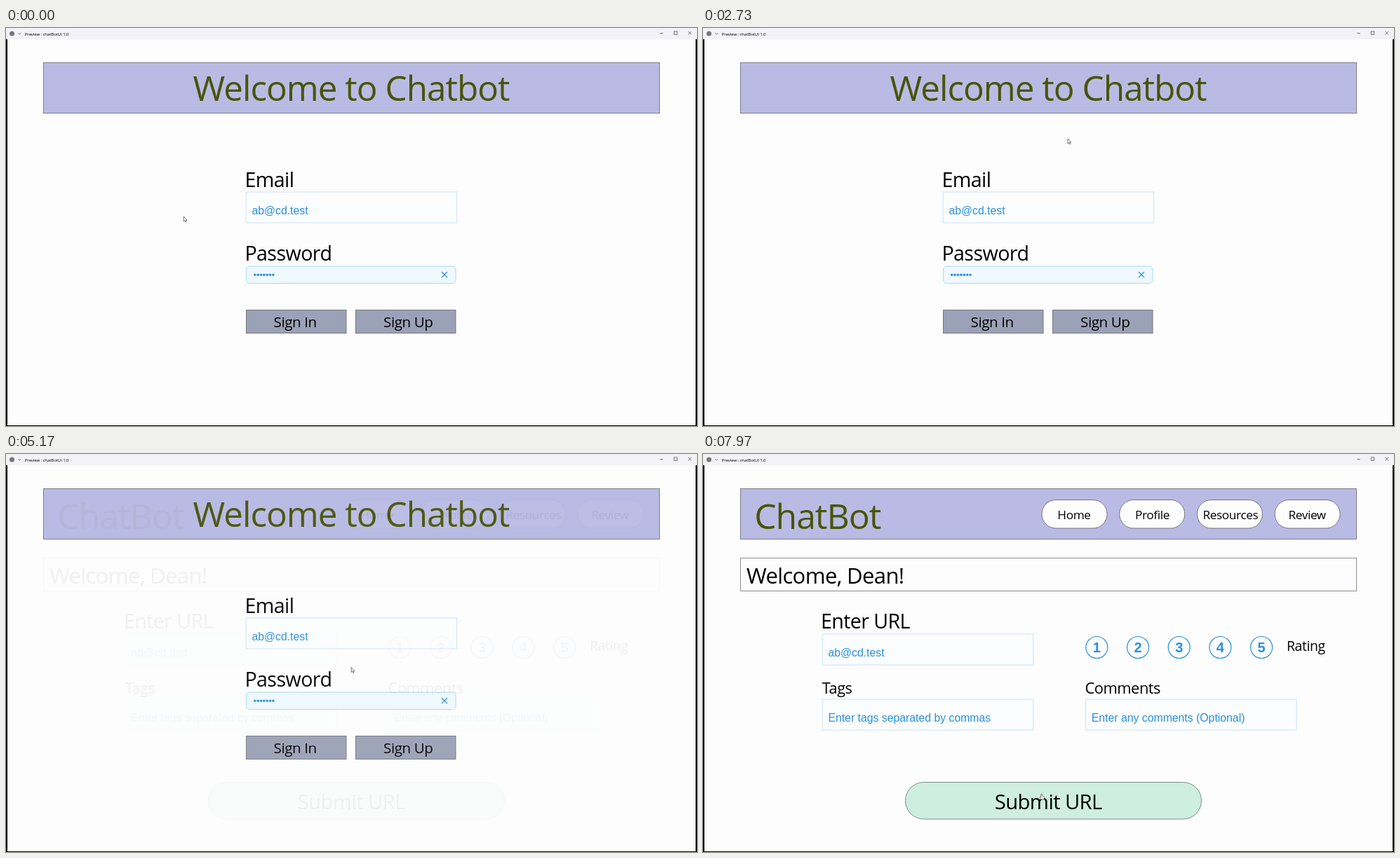
Write an HTML page that moves like this. It is 985 px wide and 568 px high and loops after 8000 ms.

```html
<!DOCTYPE html>
<html lang="en">
<head>
<meta charset="utf-8">
<title>Chatbot preview</title>
<style>
  html, body { margin: 0; width: 100%; height: 100%; overflow: hidden; background: #fdfdfd; }
  svg { display: block; width: 100vw; height: 100vh; }
  text { font-family: "Open Sans", "Noto Sans", sans-serif; letter-spacing: -.02em; fill: #000; white-space: pre; }
  .title { fill: #485408; }
  .input { font-family: "Liberation Sans", Arial, sans-serif; letter-spacing: 0; fill: #2990dd; }
  .digit { font-weight: bold; text-anchor: middle; }
  .bar { fill: #babbe4; stroke: #7c7c88; }
  .button { fill: #9ba1b6; stroke: #77797f; }
  .pill { fill: #fdfdfd; stroke: #74747c; }
  .outline { fill: none; stroke: #8c8c92; }
  .field { fill: #fcfdfe; stroke: #cbe2f7; }
  .secret { fill: #eff8fd; stroke: #a2ddf3; }
  .submit { fill: #cdeee0; stroke: #7d8a85; }
  .ring { fill: #fdfdfd; stroke: #2990dd; stroke-width: 1.2; }
  .mark { fill: none; stroke: #2990dd; stroke-width: 1.2; }
  .control { fill: none; stroke: #555; stroke-width: .8; }
  .pointer { fill: #fff; stroke: #555; stroke-width: .8; stroke-linejoin: round; }
</style>
</head>
<body>
<svg id="stage" viewBox="0 0 985 568" preserveAspectRatio="none">
  <rect width="985" height="568" fill="#fdfdfd"/>
  <g id="login"></g>
  <g id="home" opacity="0"><rect y="16" width="985" height="552" fill="#fdfdfd"/></g>
  <g id="frame"></g>
  <g id="cursor">
    <path id="arrow" class="pointer" d="M0 0V7.1L1.6 5.6L2.7 8L3.7 7.5L2.7 5.2H4.8Z"/>
    <path id="hand" class="pointer" d="M-.7 .6Q0 -.3 .7 .6V3L3.4 3.6Q4.1 3.9 4 4.8L3.4 8H-.5L-2.5 5.2Q-2.6 4.2 -.7 5Z"/>
  </g>
</svg>
<script>
const LOOP = 8000;
const FADE_START = 5100, FADE_TIME = 500;
const byId = id => document.getElementById(id);
const login = byId("login"), home = byId("home"), frame = byId("frame");
const cursor = byId("cursor"), arrow = byId("arrow"), hand = byId("hand");

function add(parent, tag, attrs, content) {
  const el = document.createElementNS("http://www.w3.org/2000/svg", tag);
  for (const key in attrs) el.setAttribute(key, attrs[key]);
  if (content) el.textContent = content;
  parent.appendChild(el);
}
const box = (parent, cls, x, y, width, height, rx = 0) =>
  add(parent, "rect", { class: cls, x, y, width, height, rx });
const label = (parent, content, x, y, size, cls = "") =>
  add(parent, "text", { class: cls, x, y, "font-size": size }, content);
const line = (parent, cls, d) => add(parent, "path", { class: cls, d });

function input(parent, content, x, y) {
  box(parent, "field", x, y, 300.5, 44);
  label(parent, content, x + 8.2, y + 32, 15.8, "input");
}

function buildLogin() {
  box(login, "bar", 53.5, 49.5, 878, 72);
  label(login, "Welcome to Chatbot", 266.5, 104, 49.4, "title");
  label(login, "Email", 340.4, 227, 28.6);
  input(login, "ab@cd.test", 342.2, 234);
  label(login, "Password", 340.4, 332.3, 28.6);
  box(login, "secret", 342.5, 340, 298.5, 24.5, 5);
  for (let i = 0; i < 7; i++)
    add(login, "circle", { cx: 354.7 + i * 4.37, cy: 352.3, r: 1.75, fill: "#2990dd" });
  line(login, "mark", "M621 348L629 356M629 348L621 356");
  box(login, "button", 342.5, 402.5, 142.5, 33);
  box(login, "button", 498.5, 402.5, 142.5, 33);
  label(login, "Sign In", 381.5, 427, 20.6);
  label(login, "Sign Up", 538, 427, 20.6);
}

function buildHome() {
  box(home, "bar", 53.5, 49.5, 878, 72);
  label(home, "ChatBot", 73.2, 106.5, 49.8, "title");
  [["Home", 505.3], ["Profile", 616], ["Resources", 712.4], ["Review", 834.4]].forEach(([name, x], i) => {
    box(home, "pill", 483 + i * 110.7, 65.5, 93, 40.5, 20);
    label(home, name, x, 93.2, 17.2);
  });
  box(home, "outline", 53.5, 148.5, 878, 47);
  label(home, "Welcome, Dean!", 62, 185, 31);
  label(home, "Enter URL", 168, 249.3, 28.6);
  input(home, "ab@cd.test", 170.2, 257);
  for (let i = 0; i < 5; i++) {
    const x = 561.3 + i * 58.7;
    add(home, "circle", { class: "ring", cx: x, cy: 276, r: 15.5 });
    label(home, String(i + 1), x, 283.2, 20, "input digit");
  }
  label(home, "Rating", 832, 281, 19.4);
  label(home, "Tags", 169.8, 342, 21.6);
  input(home, "Enter tags separated by commas", 170.2, 350);
  label(home, "Comments", 544.4, 342, 21.8);
  input(home, "Enter any comments (Optional)", 545.6, 350);
  box(home, "submit", 288.5, 468.5, 422, 52.5, 26.2);
  label(home, "Submit URL", 415.8, 507, 29.2);
}

function buildFrame() {
  add(frame, "rect", { width: 985, height: 16, fill: "#f2f2f7" });
  add(frame, "path", { d: "M0 16H2V567H983V16H985V568H0Z", fill: "#000" });
  add(frame, "circle", { cx: 8.5, cy: 8, r: 3.5, fill: "#777" });
  line(frame, "control", "M17.2 7.2L19.2 9.2L21.2 7.2");
  label(frame, "Preview : chatBotUI 1.0", 26.8, 10.5, 6.15);
  line(frame, "control", "M932.3 7.5H936.8M952.3 4.8H956.8V9.3H952.3ZM972.4 4.8L977 9.4M977 4.8L972.4 9.4");
}

// Pointer stops: time, x, y
const stops = [
  [0, 253.3, 269], [700, 253.3, 269], [1500, 256.8, 277.3], [1750, 256.8, 277.3],
  [2650, 520, 158], [2850, 520, 158], [3680, 450.5, 416], [4250, 450.5, 416],
  [4780, 492, 305], [5050, 492, 305], [5900, 496.5, 295], [6400, 496.5, 295],
  [7500, 482.5, 485], [LOOP, 482.5, 485]
];
const clamp = v => Math.min(1, Math.max(0, v));
const ease = p => .5 - Math.cos(Math.PI * clamp(p)) / 2;

function pointerAt(t) {
  const i = stops.findIndex(s => s[0] > t);
  const [t0, x0, y0] = stops[i - 1], [t1, x1, y1] = stops[i];
  const p = ease((t - t0) / (t1 - t0));
  return [x0 + (x1 - x0) * p, y0 + (y1 - y0) * p];
}

function render(t) {
  home.setAttribute("opacity", ease((t - FADE_START) / FADE_TIME));
  const [x, y] = pointerAt(t);
  const over = t < FADE_START ? y > 402 && y < 436 : y > 468;
  cursor.setAttribute("transform", `translate(${x} ${y})`);
  arrow.setAttribute("visibility", over ? "hidden" : "visible");
  hand.setAttribute("visibility", over ? "visible" : "hidden");
}

buildLogin();
buildHome();
buildFrame();
const start = performance.now();
function tick() {
  render((performance.now() - start) % LOOP);
  requestAnimationFrame(tick);
}
tick();
</script>
</body>
</html>
```
